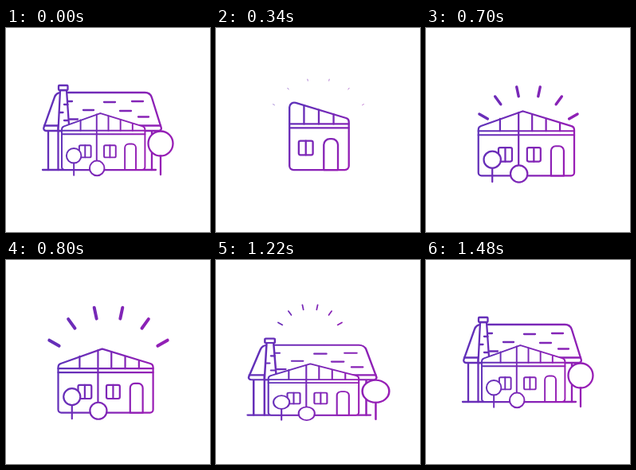
Animation of 256 by 256 pixels, one loop 1620 ms. Source, as an HTML page with a canvas:

```html
<!DOCTYPE html>
<html>
<head>
<meta charset="utf-8">
<title>Growing house</title>
<style>
html, body { margin: 0; width: 100%; height: 100%; overflow: hidden; background: #fff; }
canvas { display: block; width: 100vw; height: 100vh; }
</style>
</head>
<body>
<canvas id="stage" width="256" height="256"></canvas>
<script>
const ctx = document.getElementById('stage').getContext('2d');
const STAGE = 540, SWAP = 100, CENTER = 128.5;

const clamp = v => Math.min(1, Math.max(0, v));
const smooth = v => { const u = clamp(v); return u * u * (3 - 2 * u); };

function tint(x0, y0, x1, y1) {
  const g = ctx.createLinearGradient(x0, y0, x1, y1);
  g.addColorStop(0, '#5f31b9');
  g.addColorStop(1, '#991db5');
  ctx.strokeStyle = g;
}

function line(x0, y0, x1, y1) {
  ctx.beginPath();
  ctx.moveTo(x0, y0);
  ctx.lineTo(x1, y1);
  ctx.stroke();
}
const across = (y, x, width) => line(x, y, x + width, y);
const upright = (x, y, height) => line(x, y, x, y + height);

// Closed white polygon with rounded corners; each point is [x, y, radius].
function shape(...points) {
  const first = points[0], last = points[points.length - 1];
  ctx.beginPath();
  ctx.moveTo((first[0] + last[0]) / 2, (first[1] + last[1]) / 2);
  points.forEach(([x, y, r], i) => {
    const next = points[(i + 1) % points.length];
    ctx.arcTo(x, y, next[0], next[1], r);
  });
  ctx.closePath();
  ctx.fill();
  ctx.stroke();
}

function box(x, y, w, h, top, bottom = top) {
  shape([x, y, top], [x + w, y, top], [x + w, y + h, bottom], [x, y + h, bottom]);
}

function pane(x, y) {
  box(x, y, 17.5, 18, 2);
  upright(x + 8.75, y, 18);
}

function tree(x, y, r, stem) {
  ctx.beginPath();
  ctx.arc(x, y, r, 0, 2 * Math.PI);
  ctx.fill();
  ctx.stroke();
  if (stem) upright(x, y + r, stem);
}

function smallHouse() {
  const left = 92, width = 73.5;
  const roof = x => 83 + (x - left) * 0.313;
  tint(92, 95, 166, 165);
  shape([left, 171, 5], [left, 83, 6], [left + width, 106, 5], [left + width, 171, 5]);
  across(112.5, left, width);
  across(117.5, left, width);
  for (let x = left + 18; x < 160; x += 18.3) upright(x, roof(x), 112.5 - roof(x));
  pane(103.5, 134);
  box(134.5, 131.5, 17.5, 39.5, 7.5, 0);
}

function mediumHouse() {
  const left = 66.5, width = 124;
  const roof = x => 82 + Math.abs(x - 124) * 0.335;
  tint(67, 110, 190, 140);
  shape([left, 166, 4], [left, 102.5, 5], [124, 82, 1],
        [left + width, 102.5, 5], [left + width, 166, 4]);
  across(107.8, left, width);
  across(113, left, width);
  for (const x of [94.5, 136, 154, 172]) upright(x, roof(x), 107.8 - roof(x));
  pane(92.5, 129.5);
  pane(129.5, 129.5);
  box(160.5, 127.5, 16.5, 38.5, 6, 0);
  upright(118.5, roof(118.5), 70);
  tree(84.5, 145, 11, 18);
  tree(119, 163.5, 11);
}

function bigHouse() {
  const tintAll = () => tint(46, 110, 210, 150);
  tintAll();
  across(178, 46, 142);
  upright(53, 129, 49);
  upright(183, 129, 49);
  shape([46, 129, 3], [63, 81, 9], [181, 81, 9], [196, 129, 3]);
  across(122.5, 48, 146);
  across(93, 123, 14);
  across(92, 158, 14);
  across(103, 97, 13);
  across(104, 143, 14);
  across(111.5, 166, 13);
  across(92, 78, 5);
  across(114.5, 80, 10);

  upright(65.5, 122, 56);
  shape([68, 78, 0], [76, 78, 0], [79.5, 129, 0], [65.5, 129, 0]);
  box(66, 72, 11.5, 6, 1);
  for (let i = 0; i < 3; i++) across(96 + 10 * i, i % 2 ? 67 : 73, 4.5);

  ctx.save();
  ctx.translate(70, 178);
  ctx.scale(0.842, 0.845);
  ctx.translate(-66.5, -166);
  mediumHouse();
  ctx.restore();

  tintAll();
  tree(194, 145, 15.5, 23.5);
}

// peak and end are times in ms; drop, shift, widen and squash hold at the peak.
const stages = [
  { draw: smallHouse, base: 171, peak: 140, end: 500,
    drop: 17, shift: 1.7, widen: 0.034, squash: 0.04,
    rays: { x: 128.5, y: 128.5, reach: 66 } },
  { draw: mediumHouse, base: 166, peak: 240, end: 540,
    drop: 26, shift: -3.5, widen: -0.04, squash: 0.047,
    rays: { x: 128.5, y: 143.5, reach: 89 } },
  { draw: bigHouse, base: 178, peak: 200, end: 400,
    drop: 21, shift: 1, widen: 0.11, squash: 0.12,
    rays: { x: 118, y: 101.5, reach: 60 } }
];
const leaving = { shift: 0, widen: 0.11, squash: 0.12 };

function drawHouse({ draw, base }, { shift, widen, squash }, drop, amount) {
  ctx.save();
  ctx.translate(CENTER + shift * amount, base + drop * amount);
  ctx.scale(1 + widen * amount, 1 - squash * amount);
  ctx.translate(-CENTER, -base);
  ctx.lineWidth = 2.3;
  draw();
  ctx.restore();
}

function drawRays({ x, y, reach }, p) {
  const length = 0.16 * reach * clamp((p - 80) / 95) * clamp((360 - p) / 95);
  if (p < SWAP || length <= 0) return;
  ctx.lineWidth = 0.28 * length;
  const outer = reach * (0.7 + 0.3 * clamp((p - 90) / 180)) - ctx.lineWidth / 2;
  const inner = outer - length;
  tint(x - reach, y, x + reach, y);
  for (let deg = 30; deg <= 150; deg += 24) {
    const c = -Math.cos(deg * Math.PI / 180), s = -Math.sin(deg * Math.PI / 180);
    line(x + c * inner, y + s * inner, x + c * outer, y + s * outer);
  }
}

function frame(now) {
  const t = now % (3 * STAGE);
  const n = Math.floor(t / STAGE), p = t % STAGE;
  const stage = stages[n], { peak, end, drop } = stage;
  const amount = p < peak ? smooth(p / peak) : smooth((end - p) / (end - peak));

  ctx.fillStyle = '#fff';
  ctx.fillRect(0, 0, 256, 256);
  ctx.lineCap = ctx.lineJoin = 'round';
  if (p < SWAP) drawHouse(stages[(n + 2) % 3], leaving, drop, amount);
  else drawHouse(stage, stage, drop, amount);
  drawRays(stage.rays, p);
  requestAnimationFrame(frame);
}
requestAnimationFrame(frame);
</script>
</body>
</html>
```
